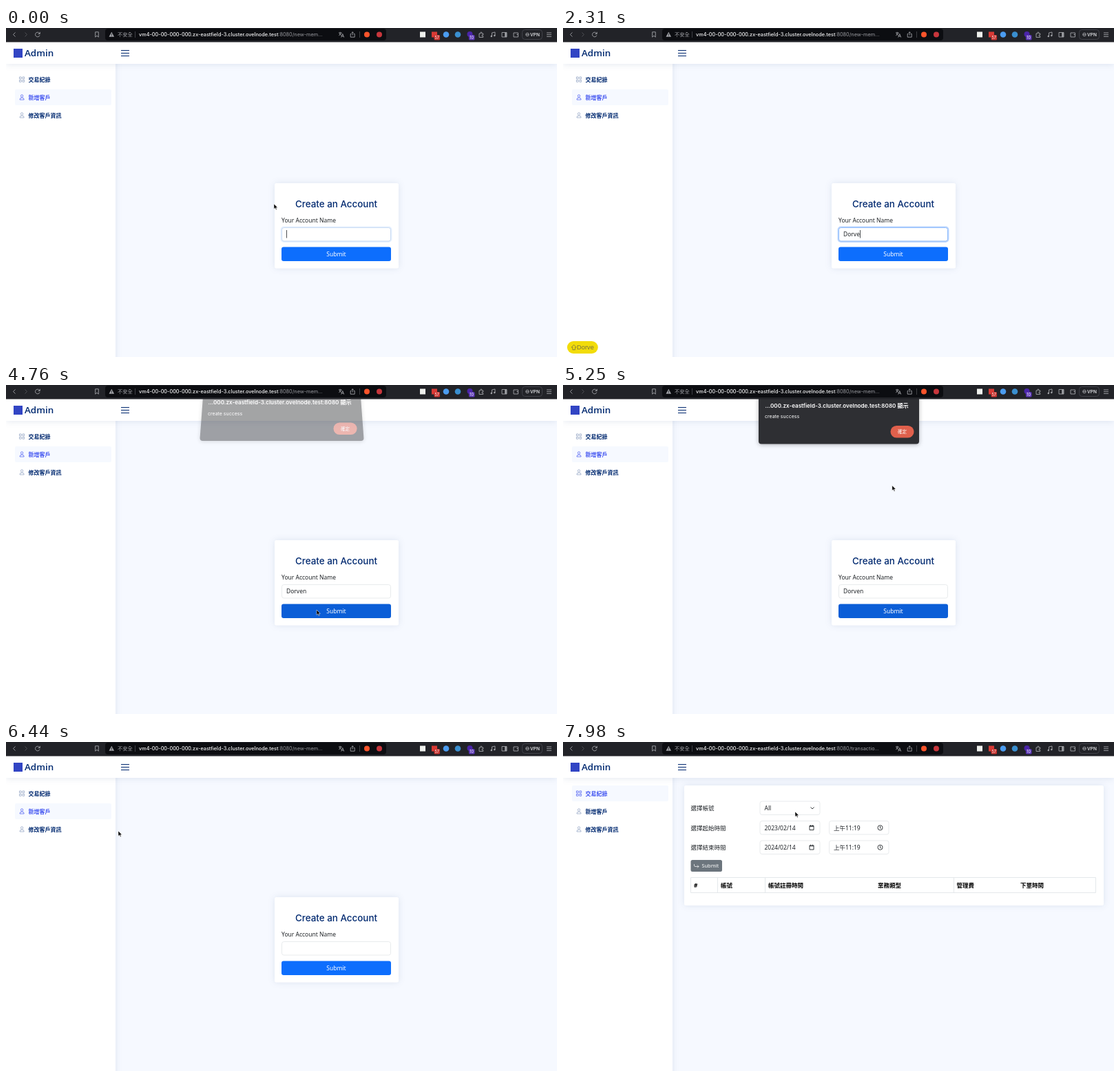
Write an HTML page that moves like this. It is 800x477 px and loops after 8 s.

```html
<!DOCTYPE html>
<html lang="zh-Hant">
<head>
<meta charset="utf-8">
<title>Admin</title>
<style>
html, body { margin: 0; width: 100%; height: 100%; overflow: hidden; background: #fff; }
svg { display: block; width: 800px; height: 477px; }
text { font: 8.5px "Noto Sans", "Noto Sans CJK TC", "Noto Sans CJK JP", sans-serif; fill: #212529; white-space: pre; }
.ui { font: 7.3px Inter, "Noto Sans CJK TC", "Noto Sans CJK JP", sans-serif; fill: #9b9ca1; }
.nav { font-size: 8px; font-weight: 700; fill: #012970; }
.mid { text-anchor: middle; }
.bold text { font-weight: 700; fill: #000; }
.box { fill: #fff; stroke: #dee2e6; stroke-width: .7; }
.card { fill: #fff; filter: drop-shadow(0 0 5px rgba(1,41,112,.1)); }
.line { fill: none; stroke: #212529; stroke-width: .9; }
.icon { fill: none; stroke: #a3a4a9; stroke-width: .9; }
.side { fill: none; stroke: #899bbd; stroke-width: .7; }
</style>
</head>
<body>
<svg viewBox="0 0 800 477">
  <rect width="800" height="477" fill="#f6f9ff"/>

  <g id="formPage">
    <rect class="card" x="390" y="225" width="180" height="123.5" rx="2.5"/>
    <text class="mid" x="479.5" y="260" style="font:500 13.4px Inter,sans-serif;fill:#012970">Create an Account</text>
    <text x="400" y="282">Your Account Name</text>
    <rect id="ring" x="399.5" y="288.5" width="160" height="21.5" rx="4" fill="none" stroke="#0d6efd" stroke-opacity=".28" stroke-width="2"/>
    <rect class="box" x="400.5" y="289.5" width="158" height="19.5" rx="3"/>
    <rect id="edge" x="400.5" y="289.5" width="158" height="19.5" rx="3" fill="none" stroke="#86b7fe" stroke-width=".9"/>
    <text id="value" x="407" y="302"></text>
    <rect id="caret" y="293" width=".8" height="11.5" fill="#212529"/>
    <rect id="submit" x="400" y="317.5" width="159" height="20.5" rx="3"/>
    <text class="mid" x="479.5" y="331" style="fill:#fff">Submit</text>
  </g>

  <g id="listPage">
    <rect class="card" x="176" y="63" width="609" height="174" rx="2.5"/>
    <text x="185.5" y="99">選擇帳號</text>
    <text x="185.5" y="127.5">選擇起始時間</text>
    <text x="185.5" y="156">選擇結束時間</text>
    <g class="box">
      <rect x="286" y="86" width="87" height="19.5" rx="3"/>
      <rect x="286" y="114.5" width="87" height="19.5" rx="3"/>
      <rect x="386.5" y="114.5" width="86.5" height="19.5" rx="3"/>
      <rect x="286" y="143" width="87" height="19.5" rx="3"/>
      <rect x="386.5" y="143" width="86.5" height="19.5" rx="3"/>
    </g>
    <text x="292.5" y="99">All</text>
    <path class="line" d="M359.5 94.5l2.5 2.5 2.5-2.5"/>
    <text x="292.5" y="127.5">2023/02/14</text><text x="393" y="127.5">上午11:19</text>
    <text x="292.5" y="156">2024/02/14</text><text x="393" y="156">上午11:19</text>
    <g id="pickers" class="line">
      <path d="M358 121.5h6v6h-6zM358 122.3h6M359.5 120.3v1M362.5 120.3v1"/>
      <path d="M464 124.3a3.5 3.5 0 1 0-7 0a3.5 3.5 0 1 0 7 0M460.5 122v2.5l1.5 1"/>
    </g>
    <use href="#pickers" y="28.5"/>
    <rect x="185.5" y="171" width="45.5" height="17" rx="2.5" fill="#6c757d"/>
    <path class="line" style="stroke:#fff;stroke-width:.7" d="M190.5 177v2q0 1.5 1.5 1.5h5M195 178.5l2 2-2 2"/>
    <text x="201.5" y="182.3" style="font-size:7.4px;fill:#fff">Submit</text>
    <path d="M185.5 196.5h588v22h-588zM224.5 196.5v22M293.5 196.5v22M567.5 196.5v22" fill="none" stroke="#dee2e6" stroke-width=".8"/>
    <g class="bold">
      <text x="190" y="210.5">#</text><text x="229" y="210.5">帳號</text>
      <text x="298" y="210.5">帳號註冊時間</text><text x="457" y="210.5">業務類型</text>
      <text x="571.5" y="210.5">管理費</text><text x="664" y="210.5">下單時間</text>
    </g>
  </g>

  <rect class="card" y="40" width="159" height="445"/>
  <g id="menu">
    <g>
      <rect x="13" y="63" width="140" height="23" rx="2" fill="#f6f9ff"/>
      <path class="side" d="M19.5 71h2.7v2.7h-2.7zM24 71h2.7v2.7h-2.7zM19.5 75.5h2.7v2.7h-2.7zM24 75.5h2.7v2.7h-2.7z"/>
      <text class="nav" x="32.5" y="77.5">交易紀錄</text>
    </g>
    <g>
      <rect x="13" y="89" width="140" height="23" rx="2" fill="#f6f9ff"/>
      <path class="side" d="M24.8 98.5a1.7 1.7 0 1 0-3.4 0a1.7 1.7 0 1 0 3.4 0M20 104q0-3 3.1-3t3.1 3z"/>
      <text class="nav" x="32.5" y="103.5">新增客戶</text>
    </g>
    <g>
      <rect x="13" y="115" width="140" height="23" rx="2" fill="#f6f9ff"/>
      <path class="side" transform="translate(0 26)" d="M24.8 98.5a1.7 1.7 0 1 0-3.4 0a1.7 1.7 0 1 0 3.4 0M20 104q0-3 3.1-3t3.1 3z"/>
      <text class="nav" x="32.5" y="129.5">修改客戶資訊</text>
    </g>
  </g>

  <rect y="10" width="800" height="42" fill="#fff" style="filter:drop-shadow(0 1px 5px rgba(1,41,112,.1))"/>
  <rect x="11" y="30" width="13" height="13" fill="#3245c4"/>
  <text x="27" y="41" style="font:600 13.4px 'Open Sans','Noto Sans',sans-serif;fill:#012970">Admin</text>
  <path d="M167 32.5h12M167 36.5h12M167 40.5h12" stroke="#012970"/>

  <g id="dialog">
    <path id="sheet" fill="#2e2f33" style="filter:drop-shadow(0 1px 3px rgba(0,0,0,.3))"/>
    <g id="sheetText">
      <text class="ui" x="293.5" y="32.5" style="font-size:8.1px;font-weight:600;fill:#fff">…000.zx-eastfield-3.cluster.ovelnode.test:8080 顯示</text>
      <text class="ui" x="293" y="48.3" style="font-size:7px;fill:#fff">create success</text>
      <rect id="ok" x="475.5" y="59" width="34" height="17.5" rx="8.7"/>
      <text class="ui mid" x="492.5" y="70.3" style="font-size:6.6px;fill:#fff">確定</text>
    </g>
  </g>

  <!-- browser bar -->
  <rect width="800" height="20.5" fill="#222328"/>
  <rect x="144" y="1" width="408" height="17" rx="4" fill="#0c0d11"/>
  <g class="icon">
    <path d="M13.5 6.5l-3 3 3 3"/>
    <path d="M27.5 6.5l3 3-3 3" stroke="#55565b"/>
    <path d="M48.8 8a3.3 3.3 0 1 0 .2 2.5M49.3 5.8v2.7h-2.7"/>
    <path d="M129.7 5.8h4.6v7.4l-2.3-2-2.3 2z"/>
    <path d="M187.5 5v9M513.5 5v9" stroke="#55565b" stroke-width=".7"/>
    <path d="M483 7h4.5M485.2 5.8V7M486.8 7q-.8 2.5-3.5 3.8M484 7.8q1 2 2.8 2.8M486.7 13.5l2-5 2 5M487.4 12h2.6"/>
    <path d="M501.5 8.5h-1.3v4.7h6V8.5h-1.3M503.2 10.5V5.8M501.7 7.2l1.5-1.5 1.5 1.5"/>
    <path d="M687 8h2q-.6-2 .9-2t.9 2h2v2q-1.8-.6-1.8.9t1.8.9v1.7H687z"/>
    <path d="M705.5 12V7l4.5-1v5"/>
    <path d="M720 6.5h7v6.5h-7z"/><path d="M725.5 6.5V13" stroke-width="2.5"/>
    <path d="M737 7h6.5v6H737zM741.5 9.5h2"/>
    <path d="M785 7h7M785 9.7h7M785 12.4h7"/>
    <rect x="749.5" y="2.5" width="29" height="14" rx="4" stroke="#4a4b52" stroke-width=".8"/>
    <circle cx="757" cy="9.5" r="2.3"/><path d="M755 9.5h4"/>
  </g>
  <circle cx="704.8" cy="12" r="1.2" fill="#a3a4a9"/><circle cx="709.3" cy="11" r="1.2" fill="#a3a4a9"/>
  <path d="M153.3 5.8l3.8 7h-7.6z" fill="#a3a4a9"/><path d="M153.3 8v2.5M153.3 11.2v.8" stroke="#0c0d11" stroke-width=".8"/>
  <circle cx="524" cy="9.5" r="4" fill="#fb542b"/>
  <circle cx="542" cy="9.5" r="4" fill="#c8363c"/>
  <rect x="601" y="5.5" width="8" height="8" fill="#eef0ec"/>
  <rect x="618" y="5.5" width="8" height="8" fill="#d93a35"/>
  <circle cx="639" cy="9.5" r="4.3" fill="#4b9cf0"/>
  <circle cx="656" cy="9.5" r="4.3" fill="#3a8fd0"/>
  <circle cx="673.5" cy="9" r="4" fill="#4a24a8"/>
  <rect x="621.5" y="10" width="8.5" height="7.5" rx="1.5" fill="#c8322e"/>
  <rect x="672" y="10" width="8.5" height="7.5" rx="1.5" fill="#5a35b5"/>
  <text class="ui mid" x="625.7" y="15.8" style="font-size:5.5px;fill:#fff">57</text>
  <text class="ui mid" x="676.2" y="15.8" style="font-size:5.5px;fill:#fff">10</text>
  <text class="ui" x="162" y="12.2">不安全</text>
  <text class="ui" x="193" y="12.2"><tspan fill="#f4f4f5" font-weight="500">vm4-00-00-000-000.zx-eastfield-3.cluster.ovelnode.test</tspan><tspan id="path"></tspan></text>
  <text class="ui" x="761" y="12" style="font-size:6.5px;font-weight:600;fill:#dcdde0">VPN</text>

  <g id="keys">
    <rect id="pill" x="6" y="454" height="18" rx="9" fill="#f2dc0a"/>
    <path d="M15.8 459.3l3.5 3.7h-1.7v3.5H14V463h-1.7z" fill="none" stroke="#77713f" stroke-width=".8"/>
    <text id="typed" x="20" y="466.3" style="font:9.3px 'Liberation Sans',Arial,sans-serif;fill:#77713f"></text>
  </g>

  <!-- arrow, text beam, hand -->
  <g id="cursor">
    <path d="M0 0V7.4L1.8 5.8 3 8.5 4.2 8 3 5.4H5.4Z" fill="#000" stroke="#fff" stroke-width=".5"/>
    <path d="M-1.7-4Q0-4 0-3 0-4 1.7-4M0-3V3M-1.7 4Q0 4 0 3 0 4 1.7 4M-1 .8H1" fill="none" stroke="#222" stroke-width=".8"/>
    <path d="M-1.5-3.5q.8-.9 1.5 0V-1q3.5 0 3.6 1.3Q3.6 3 2.4 4.3H-1.2L-3.5 1q.2-1.2 2 .2Z" fill="#fff" stroke="#111" stroke-width=".8"/>
  </g>
</svg>
<script>
const $ = id => document.getElementById(id);
const show = (el, on) => el.style.display = on ? '' : 'none';
const ramp = (t, a, b) => Math.min(1, Math.max(0, (t - a) / (b - a)));
const between = (t, a, b) => t >= a && t < b;

const LOOP = 8000, NAME = 'Dorven';
const keyTimes = [2030, 2100, 2170, 2240, 2310, 2450];
// time, x, y
const moves = [
  [0, 389, 255], [840, 433, 303], [3150, 433, 303], [3290, 440, 316], [3480, 440, 316],
  [3570, 448, 326], [3850, 451, 326], [4830, 451, 326], [5500, 490, 64], [5800, 497, 70],
  [5880, 499, 74], [6440, 163, 129], [6800, 48, 76], [7400, 48, 76], [7980, 337, 101]
];

function pointer(t) {
  const i = moves.findIndex(m => m[0] > t);
  if (i < 0) return moves[moves.length - 1].slice(1);
  const [a, b] = [moves[i - 1], moves[i]];
  const u = ramp(t, a[0], b[0]), s = u * u * (3 - 2 * u);
  return [a[1] + (b[1] - a[1]) * s, a[2] + (b[2] - a[2]) * s];
}

// The blink restarts at focus and at each key
function caretLit(t) {
  if (t < 70) return true;
  if (!between(t, 1050, 4200)) return false;
  const restart = Math.max(1050, ...keyTimes.filter(k => k <= t));
  return Math.floor((t - restart) / 500) % 2 === 0;
}

function drawForm(t) {
  const word = NAME.slice(0, keyTimes.filter(k => t >= k).length);
  $('value').textContent = t < 5850 ? word : '';

  const focus = t < 1000 ? .35 * (1 - ramp(t, 20, 90))
    : ramp(t, 1050, 1200) * (1 - ramp(t, 4200, 4350));
  $('ring').style.opacity = $('edge').style.opacity = focus;
  show($('caret'), caretLit(t));
  $('caret').setAttribute('x', 407.2 + (word ? $('value').getComputedTextLength() : 0));

  const hover = t < 5960 ? ramp(t, 3560, 3710) : 0;
  $('submit').setAttribute('fill', `rgb(${13 - 2 * hover},${110 - 16 * hover},${253 - 38 * hover})`);

  $('typed').textContent = word;
  $('pill').setAttribute('width', 20 + (word ? $('typed').getComputedTextLength() : 0));
  $('keys').style.opacity = ramp(t, 1410, 1680) * (1 - ramp(t, 4410, 4620));
}

function drawDialog(t) {
  const open = t > 5500 ? 1 - ramp(t, 5820, 5960) : ramp(t, 4700, 4840);
  const k = 1 - open, lift = 8 * k, tilt = 4.3 * k;
  const bottom = 85.5 - lift;
  $('dialog').style.opacity = open;
  $('sheet').setAttribute('d', `M${284 + tilt} 12L${284 - tilt} ${bottom - 4}q0 4 4 4H${513 + tilt}q4 0 4-4L${517 - tilt} 12Z`);
  $('sheetText').setAttribute('transform', `translate(0 ${-lift})`);
  $('ok').setAttribute('fill', t > 5700 ? '#fa8878' : '#e0604c');
}

function drawPage(t, overNav) {
  const list = t >= 7000;
  show($('formPage'), !list);
  show($('listPage'), list);
  $('path').textContent = ':8080' + (list ? '/transactio…' : '/new-mem…');
  [...$('menu').children].forEach((row, i) => {
    const on = i === (list ? 0 : 1) || i === 0 && overNav;
    const [back, icon, label] = row.children;
    show(back, on);
    icon.style.stroke = label.style.fill = on ? '#4154f1' : '';
  });
}

function drawCursor(t, x, y, overNav) {
  const overField = t < 3200 && x > 400 && y > 289;
  const hand = between(t, 3500, 4690) || overNav;
  const shape = hand ? 2 : overField ? 1 : 0;
  [...$('cursor').children].forEach((c, i) => show(c, i === shape));
  show($('cursor'), !between(t, 2030, 3150));
  $('cursor').setAttribute('transform', `translate(${x} ${y})`);
}

function frame() {
  const t = performance.now() % LOOP;
  const [x, y] = pointer(t);
  const overNav = t > 6440 && x < 153 && y < 87;
  drawForm(t);
  drawDialog(t);
  drawPage(t, overNav);
  drawCursor(t, x, y, overNav);
  requestAnimationFrame(frame);
}
frame();
</script>
</body>
</html>
```
